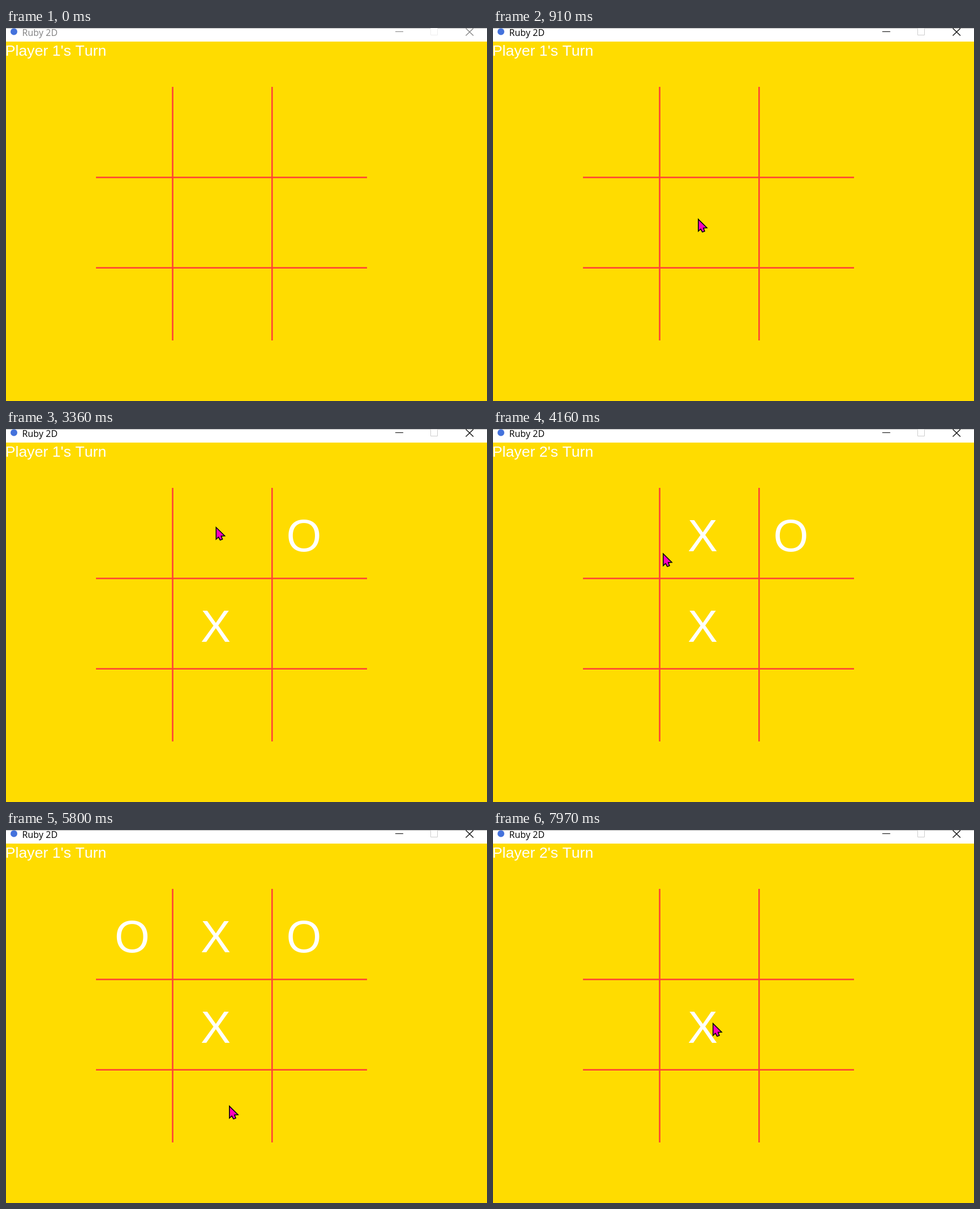
These frames come from a looping animation (850x659 px, 8 s). An HTML page with a canvas:

```html
<!DOCTYPE html>
<html lang="en">
<head>
<meta charset="utf-8">
<title>Tic-tac-toe</title>
<style>
html, body { margin: 0; width: 100%; height: 100%; overflow: hidden; background: #ffdc00; }
canvas { display: block; }
</style>
</head>
<body>
<canvas id="stage" width="850" height="659"></canvas>
<script>
const ctx = document.getElementById('stage').getContext('2d');
const LOOP = 8000, FOCUS = 50, RED = '#ff4136';
const ARIAL = '"Liberation Sans", Arial, sans-serif';
const COLUMNS = [223, 370.5, 526.5];

// clicked cells, counted row by row; restart clears the board
const PLAYS = [
  { at: 2120, cell: 4 }, { at: 2870, cell: 2 }, { at: 3630, cell: 1 },
  { at: 4990, cell: 0 }, { at: 5980, cell: 7 },
  { at: 7150, restart: true }, { at: 7910, cell: 4 }
];

// pointer moves: each slows down into its end point, some bend towards a second point
const ENTRY = [790, 680];
const MOVES = [
  { from: FOCUS, until: 810, to: [362, 337] },
  { from: 2430, until: 2690, to: [556, 204] },
  { from: 3220, until: 3526, to: [336, 167] },
  { from: 4080, until: 4500, to: [311, 316], bend: [275, 205] },
  { from: 4610, until: 4830, to: [212, 206], bend: [306, 262] },
  { from: 5390, until: 5650, to: [394, 487] },
  { from: 7410, until: 7880, to: [388, 341], bend: [491, 400] }
];
const ARROW = new Path2D('M.8 1V22L5 18.2L8 23.5L12 22L9.8 16.4L16 16Z');

function text(str, x, y, size, color, align = 'left', font = ARIAL) {
  ctx.font = size + 'px ' + font;
  ctx.textAlign = align;
  ctx.fillStyle = color;
  ctx.fillText(str, x, y);
}

function rect(x, y, w, h, color) {
  ctx.fillStyle = color;
  ctx.fillRect(x, y, w, h);
}

function stroke(path, color, width) {
  ctx.strokeStyle = color;
  ctx.lineWidth = width;
  ctx.stroke(new Path2D(path));
}

function titleBar(active) {
  const ink = active ? '#000' : '#808080';
  rect(0, 0, 850, 24, '#fff');
  rect(0, 0, 850, 1, '#b4b4b4');
  ctx.fillStyle = '#4472dc';
  ctx.beginPath();
  ctx.arc(14, 6.5, 6, 0, 7);
  ctx.fill();
  text('Ruby 2D', 28.5, 13.5, 16, ink, 'left', '"Open Sans", "Noto Sans", sans-serif');
  stroke('M688 6.5H702', ink, 1);
  stroke('M750.5 .5h12v12h-12z', active ? '#ccc' : '#eee', 1);
  stroke('M812.5 .5L826 13.5M826 .5L812.5 13.5', ink, 1.2);
}

function board(t) {
  for (const x of [294.5, 470.2]) rect(x - 1.3, 104, 2.6, 448, RED);
  for (const y of [264, 423.7]) rect(159, y - 1.3, 479, 2.6, RED);

  let cells = [];
  for (const { at, cell, restart } of PLAYS)
    if (t >= at) cells = restart ? [] : [...cells, cell];

  cells.forEach((cell, i) =>
    text('XO'[i % 2], COLUMNS[cell % 3], 216 + 160 * Math.floor(cell / 3), 79.5, '#fff', 'center'));
  text(`Player ${1 + cells.length % 2}'s Turn`, -1.2, 49, 26.67, '#fff');

  if (cells.length === 5) {
    const message = "Game over, Player 1 wins! Press 'R' to restart.";
    text(message, 150.5, 102.5, 26.9, RED);
    ctx.strokeStyle = RED;
    ctx.lineWidth = .8;
    ctx.strokeText(message, 150.5, 102.5);
  }
}

function pointer(t) {
  let pos = ENTRY;
  for (const { from, until, to, bend } of MOVES) {
    if (t < from) break;
    const u = Math.min(1, (t - from) / (until - from));
    const k = 1 - (1 - u) ** 3;
    pos = pos.map((a, i) => {
      const mid = bend ? bend[i] : (a + to[i]) / 2;
      return a * (1 - k) ** 2 + 2 * mid * k * (1 - k) + to[i] * k * k;
    });
  }
  ctx.save();
  ctx.translate(...pos);
  ctx.fillStyle = '#ff00bf';
  ctx.fill(ARROW);
  stroke(ARROW, '#000', 1.6);
  ctx.restore();
}

function draw(t) {
  rect(0, 0, 850, 659, '#ffdc00');
  titleBar(t >= FOCUS);
  board(t);
  pointer(t);
}

ctx.fontKerning = 'none';
const start = performance.now();
function frame() {
  draw((performance.now() - start) % LOOP);
  requestAnimationFrame(frame);
}
frame();
</script>
</body>
</html>
```
